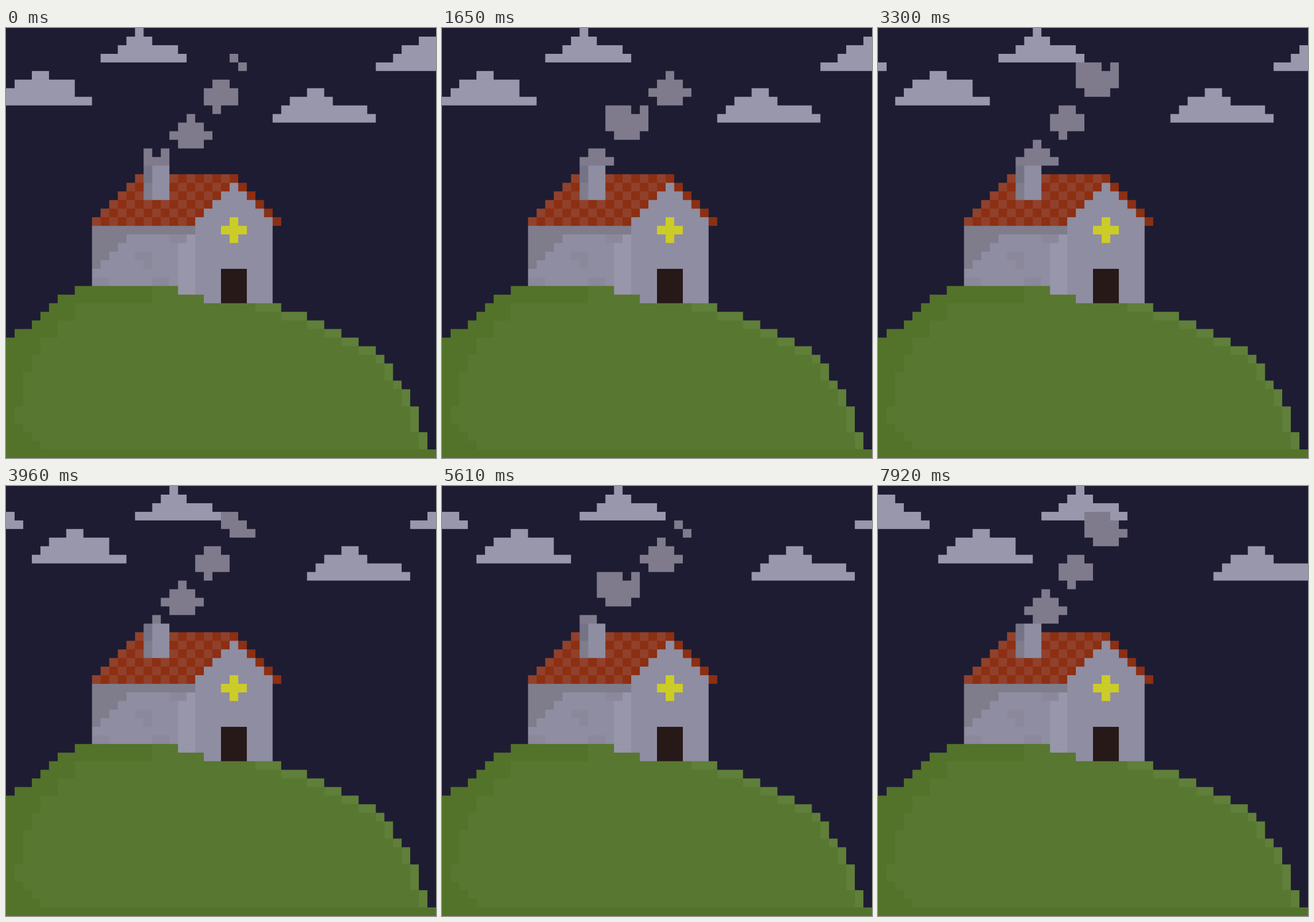
These frames come from a looping animation (748x748 px, 8000 ms). An HTML page with a canvas:

```html
<!DOCTYPE html>
<html lang="en">
<head>
<meta charset="utf-8">
<title>House on a hill</title>
<style>
  html, body { margin: 0; width: 100%; height: 100%; overflow: hidden; background: #1e1c32; }
  canvas { display: block; width: 100vw; height: 100vh; }
</style>
</head>
<body>
<canvas id="stage" width="750" height="750"></canvas>
<script>
const ctx = document.getElementById('stage').getContext('2d');
const CELL = 15, FRAME = 330, LOOP = 8000, CYCLE = 13, CLOUD_WRAP = 58;
const C = {
  sky: '#1e1c32', cloud: '#9997ab', smoke: '#7f7b8c',
  wall: '#8f8da1', strip: '#9896aa', shade: '#7f7c8c', blotch: '#8a889a', flue: '#757386',
  roof: '#8c2f13', tile: '#91412b', window: '#cccc28', door: '#261918',
  grass: '#587730', grassDark: '#53722a', grassLight: '#5f7f3a'
};

// Fills cells from x0 up to x1 (exclusive), h rows tall.
function fill(color, x0, x1, y, h = 1) {
  ctx.fillStyle = color;
  ctx.fillRect(x0, y, x1 - x0, h);
}

// Each cloud: top row, then its left and right edge per row.
const clouds = [
  { y: 0, rows: [[15, 16], [14, 17], [13, 20], [11, 21]] },
  { y: 5, rows: [[3, 5], [1, 8], [0, 8], [-1, 10]] },
  { y: 7, rows: [[35, 37], [33, 38], [32, 42], [31, 43]] },
  { y: 1, rows: [[48, 52], [46, 53], [45, 55], [43, 56]] }
];

// Puffs with their place at the start of the smoke cycle, built from blocks x, y, w, h.
const puffs = [
  { x: 19, y: 10, blocks: [[2, 0, 1, 4], [1, 1, 3, 3], [0, 2, 5, 1]] },
  { x: 23, y: 6, blocks: [[1, 0, 1, 4], [2, 0, 1, 3], [0, 1, 4, 2]] },
  { x: 14, y: 14, blocks: [[0, 0, 3, 3], [4, 0, 1, 1], [0, 1, 5, 2], [1, 3, 3, 1]] }
];

function drawClouds(step) {
  for (const { y, rows } of clouds)
    rows.forEach(([a, b], i) => {
      for (const shift of [step, step - CLOUD_WRAP])
        fill(C.cloud, a + shift, b + shift, y + i);
    });
}

// Smoke shows only above the chimney and ends along a diagonal.
const smokeArea = new Path2D();
for (let y = 3; y < 16; y++) smokeArea.rect(16, y, y + 8, 1);

function drawSmoke(phase) {
  ctx.save();
  ctx.clip(smokeArea);
  ctx.fillStyle = C.smoke;
  for (const puff of puffs)
    for (let lap = -1; lap <= 1; lap++) {
      const n = phase + lap * CYCLE;
      // The drift to the right pauses once per cycle.
      const left = puff.x + n - Math.floor((n + 4) / CYCLE);
      for (const [x, y, w, h] of puff.blocks)
        ctx.fillRect(left + x, puff.y - n + y, w, h);
    }
  ctx.restore();
}

const hillLeft = y => Math.max(0, Math.floor(8.25 - 1.3 * (y - 30)));
const hillRight = y => Math.round(49.71 - 17.64 * Math.exp(-0.179 * (y - 32)));
// Inner edge of the shadow: steps every second row, then returns at the foot.
const shadowEdge = y => Math.max(y - 44, Math.round(1 + 7 * Math.exp(-0.44 * Math.floor((y - 32) / 2))));

function drawHill() {
  for (let y = 30; y < 49; y++) {
    const end = hillRight(y);
    fill(C.grassDark, hillLeft(y), end, y);
    fill(C.grass, y < 32 ? 17 : shadowEdge(y), end, y);
    fill(C.grassLight, Math.min(hillRight(y - 1), end - 1), end, y);
  }
  fill(C.grassDark, 0, 50, 49);
}

function drawRoof() {
  for (let i = 0; i < 6; i++)
    for (let x = 15 - i, y = 17 + i; x < 27 + i; x++)
      fill((x + y) % 2 ? C.roof : C.tile, x, x + 1, y);
}

function drawHouse() {
  drawRoof();

  // Chimney
  fill(C.wall, 17, 19, 16, 4);
  fill(C.shade, 16, 17, 16, 4);
  fill(C.flue, 16, 17, 16, 2);

  // Side wall with the shadow under the eaves
  fill(C.wall, 10, 20, 23, 7);
  fill(C.strip, 20, 22, 24, 7);
  fill(C.shade, 10, 22, 23);
  for (let i = 0; i < 4; i++) fill(C.shade, 10, 14 - i, 24 + i);
  fill(C.blotch, 19, 21, 24);
  fill(C.blotch, 15, 17, 26);
  fill(C.blotch, 16, 17, 27);
  fill(C.blotch, 17, 19, 29);
  fill(C.blotch, 10, 12, 29);

  // Front wall
  for (let i = 0; i < 5; i++) fill(C.wall, 26 - i, 27 + i, 18 + i);
  fill(C.wall, 22, 31, 23, 8);
  fill(C.wall, 23, 31, 31);
  fill(C.window, 26, 27, 22, 3);
  fill(C.window, 25, 28, 23);
  fill(C.door, 25, 28, 28, 4);
}

function draw(now) {
  const frame = Math.floor((now % LOOP) / FRAME);
  fill(C.sky, 0, 50, 0, 50);
  drawClouds(Math.floor(frame / 3));
  drawSmoke(frame % CYCLE);
  drawHill();
  drawHouse();
}

ctx.scale(CELL, CELL);
const start = performance.now();
function tick() {
  draw(performance.now() - start);
  requestAnimationFrame(tick);
}
tick();
</script>
</body>
</html>
```
